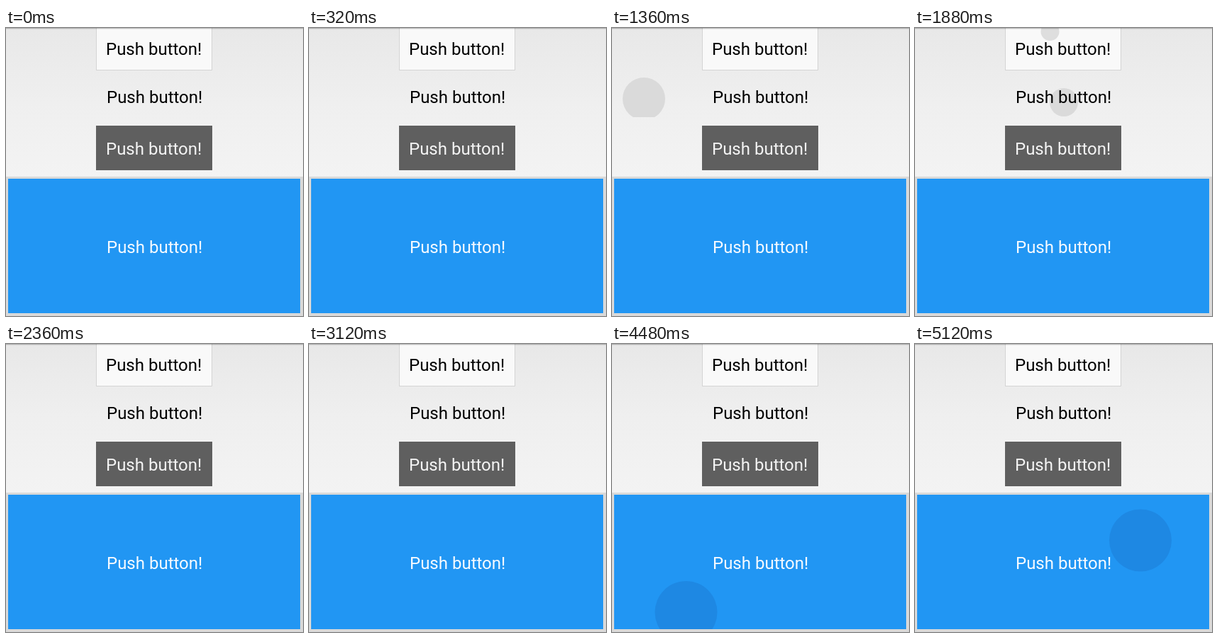
Write an HTML page with a canvas that moves like this. It is 419 px wide and 407 px high and loops after 5.6 s.

```html
<!DOCTYPE html>
<html lang="en">
<head>
<meta charset="utf-8">
<title>Ripple buttons</title>
<style>
html, body { margin: 0; width: 100%; height: 100%; overflow: hidden; }
canvas { display: block; width: 419px; height: 407px; }
</style>
</head>
<body>
<canvas id="stage" width="419" height="407"></canvas>
<script>
const ctx = document.getElementById('stage').getContext('2d');
const LOOP = 5600, STEP = 40;

const raised = { x: 128, y: 0, w: 162, h: 59, ink: '#dedede' };
const flat = { x: 14, y: 68, w: 392, h: 58, ink: '#dadada' };
const dark = { x: 127, y: 138, w: 164, h: 63, ink: '#696969' };
const card = { x: 3, y: 213, w: 412, h: 190, ink: '#1e88e3' };

// start and end in ms, first radius, growth per ms, largest radius
const ripples = [
  { on: raised, x: 150, y: 34, start: 200, end: 320, r: 28, grow: 1.3, max: 170 },
  { on: raised, x: 280, y: 15, start: 840, end: 1000, r: 20, grow: 0.6, accel: 0.006, max: 170 },
  { on: raised, x: 215, y: 25, start: 1160, end: 1320, r: 20, grow: 0.7, max: 100 },
  { on: flat, x: 45, y: 100, start: 1320, end: 1520, r: 20, grow: 0.25, max: 63 },
  { on: flat, x: 210, y: 105, start: 1800, end: 2040, r: 20, hold: 80, grow: 0.35, max: 63 },
  { on: raised, x: 190.5, y: 5, start: 1880, end: 2080, r: 13, grow: 0.6, max: 100 },
  { on: flat, x: 375, y: 96, start: 2560, end: 2720, r: 20, grow: 0.3, max: 63 },
  { on: dark, x: 235, y: 178, start: 2640, end: 3120, r: 8, grow: 0.18, max: 22 },
  { on: dark, x: 150, y: 175, start: 3200, end: 4320, r: 44, grow: 3, max: 170 },
  { on: card, x: 19, y: 234, start: 3440, end: 4320, r: 9, grow: 0.22, max: 44 },
  { on: card, x: 104.5, y: 379, start: 4320, end: 4960, r: 9, grow: 0.22, max: 44 },
  { on: card, x: 318, y: 277.5, start: 4960, end: LOOP, r: 9, grow: 0.22, max: 44 }
];

function rect(color, x, y, w, h) {
  ctx.fillStyle = color;
  ctx.fillRect(x, y, w, h);
}

function label(color, x, y) {
  ctx.fillStyle = color;
  ctx.fillText('Push button!', x, y);
}

function drawRipple(p, t) {
  if (t < p.start || t >= p.end) return;
  const age = Math.max(0, t - p.start - (p.hold || 0));
  const r = Math.min(p.max, p.r + p.grow * age + (p.accel || 0) * age * age / 2);
  const b = p.on;
  ctx.save();
  ctx.beginPath();
  ctx.rect(b.x, b.y, b.w, b.h);
  ctx.clip();
  ctx.beginPath();
  ctx.arc(p.x, p.y, r, 0, Math.PI * 2);
  ctx.fillStyle = b.ink;
  ctx.fill();
  ctx.restore();
}

const backdrop = ctx.createLinearGradient(0, 0, 0, 210);
backdrop.addColorStop(0, '#e8e8e8');
backdrop.addColorStop(0.5, '#efefef');
backdrop.addColorStop(1, '#f3f3f3');

function draw(t) {
  rect(backdrop, 0, 0, 419, 407);
  rect('#d4d4d4', 127, 0, 164, 60);
  rect('#f9f9f9', 128, 0, 162, 59);
  rect('#5f5f5f', dark.x, dark.y, dark.w, dark.h);
  rect('#d9d9d9', 0, 210, 419, 197);
  rect('#2196f3', card.x, card.y, card.w, card.h);

  ripples.forEach(p => drawRipple(p, t));

  rect('rgba(0,0,0,0.24)', 0, 0, 419, 1);
  rect('rgba(0,0,0,0.06)', 0, 1, 419, 1);

  ctx.font = '24px Roboto, sans-serif';
  label('#000', 141, 38);
  label('#000', 142, 106);
  label('#f4f4f4', 141, 179);
  label('#f6faff', 142, 318);
}

const origin = performance.now();
function tick() {
  const t = (performance.now() - origin) % LOOP;
  draw(Math.floor(t / STEP) * STEP);
  requestAnimationFrame(tick);
}
tick();
</script>
</body>
</html>
```
